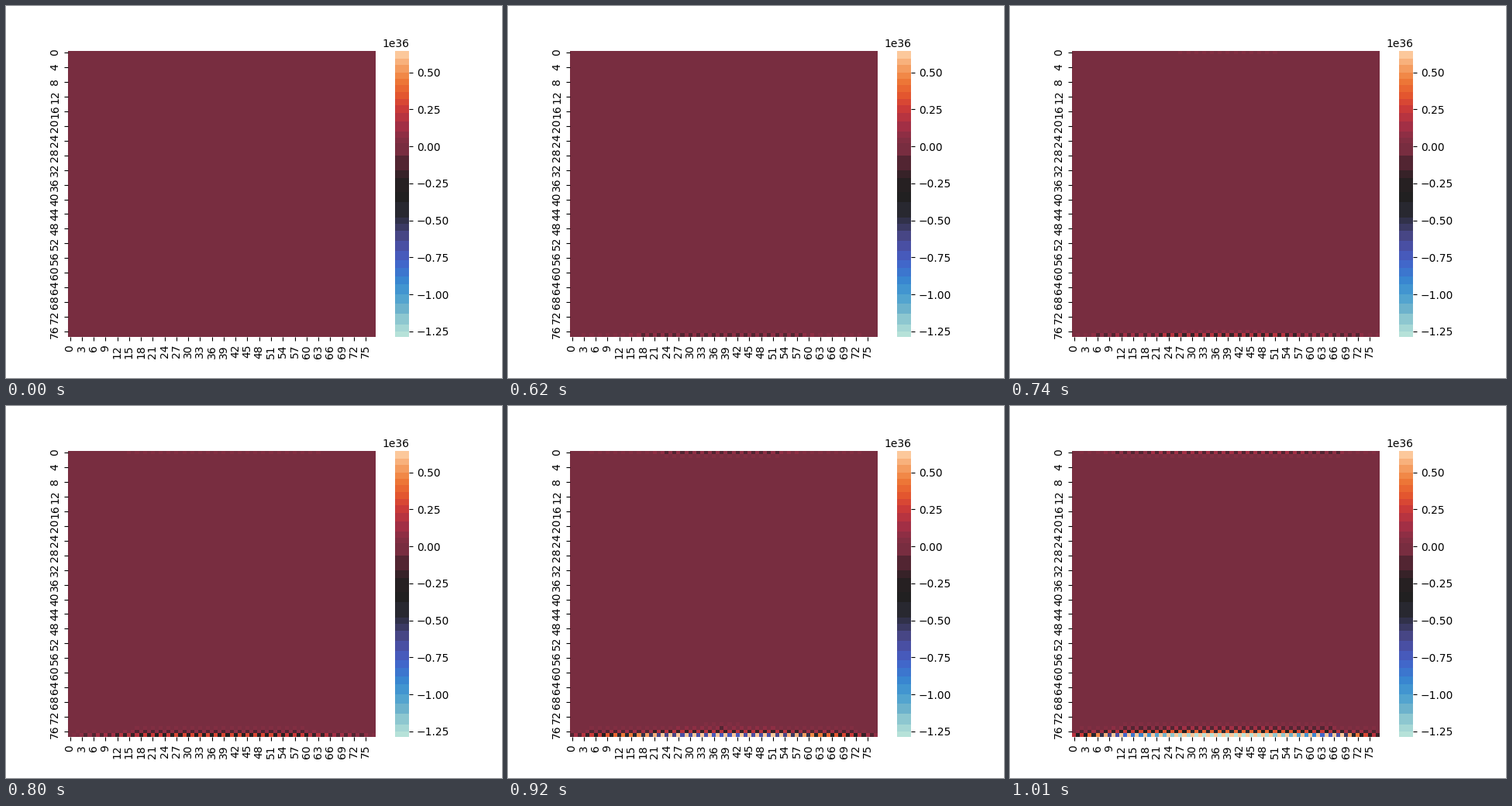
Write a matplotlib script that moves like this. It is 640 px wide and 480 px high and loops after 1040 ms.

```python
import numpy as np
import matplotlib.pyplot as plt
from matplotlib.animation import FuncAnimation
from matplotlib.colors import ListedColormap, to_rgb

N = 78
VMIN, VMAX = -1.288e36, 0.646e36
TOP, BOTTOM = 57.6, 427.2
HOLD, STEP = 50, 3

# colour ramp from cold to hot: position, colour
RAMP = [
    (0, "#bde7db"), (.05, "#98ced2"), (.1, "#6cb2cc"), (.15, "#479dd0"),
    (.2, "#3885d0"), (.25, "#4069cd"), (.3, "#4a53b3"), (.35, "#484789"),
    (.38, "#3d3b67"), (.41, "#2f3046"), (.45, "#27272d"), (.5, "#1f1e1e"),
    (.55, "#2a2124"), (.6, "#4c2430"), (.65, "#702b3e"), (.667, "#782d40"),
    (.7, "#882e44"), (.75, "#ab3045"), (.8, "#cf3c37"), (.85, "#e65a2e"),
    (.9, "#ef7e3a"), (.95, "#f6a870"), (1, "#ffd4ac"),
]
# colour band borders, as heights on the colour bar
EDGES = [68, 77, 86, 94, 103, 111, 120, 129, 139, 149, 161, 170, 177.6, 193,
         212, 222, 240, 252, 273, 281, 290, 303, 316, 328, 338, 349, 359,
         372, 384, 397, 411, 420]


def banded_map():
    pos = [p for p, _ in RAMP]
    rgb = np.array([to_rgb(c) for _, c in RAMP])
    edges = np.array([TOP, *EDGES, BOTTOM])
    mids = (edges[:-1] + edges[1:]) / 2
    level = (BOTTOM - mids) / (BOTTOM - TOP)
    zero = np.searchsorted(EDGES, 181)
    level[zero] = .667
    bands = np.stack([np.interp(level, pos, ch) for ch in rgb.T], axis=1)
    y = BOTTOM - (np.arange(256) + .5) / 256 * (BOTTOM - TOP)
    return ListedColormap(bands[np.searchsorted(EDGES, y)])


row, col = np.mgrid[:N, :N]
checker = np.where((row + col) % 2, -1.0, 1.0)
envelope = np.sin(np.pi * (col + 3.5) / 84)
decay = .3 ** (N - 1.0 - row) - .105 * .3 ** row
mode = checker * envelope * decay


def field(i):
    """Unstable checkerboard: grows and flips sign at every step."""
    if i < HOLD:
        return np.zeros((N, N))
    k = (i - HOLD) // STEP
    return .09e36 * 1.23 ** (k - 4) * (-1) ** k * mode


fig, ax = plt.subplots(figsize=(6.4, 4.8), dpi=100)
mesh = ax.pcolormesh(field(0), cmap=banded_map(), vmin=VMIN, vmax=VMAX)
ax.set(xlim=(0, N), ylim=(N, 0))
ax.spines[:].set_visible(False)
bar = fig.colorbar(mesh, ax=ax)
bar.outline.set_linewidth(0)

xs, ys = np.arange(0, N, 3), np.arange(0, N, 4)
ax.set_xticks(xs + .5, xs, rotation=90)
ax.set_yticks(ys + .5, ys, rotation=90, va="center")


def update(i):
    mesh.set_array(field(i))
    return [mesh]


anim = FuncAnimation(fig, update, frames=104, interval=10, repeat=True,
                     repeat_delay=0)
plt.show()
```
